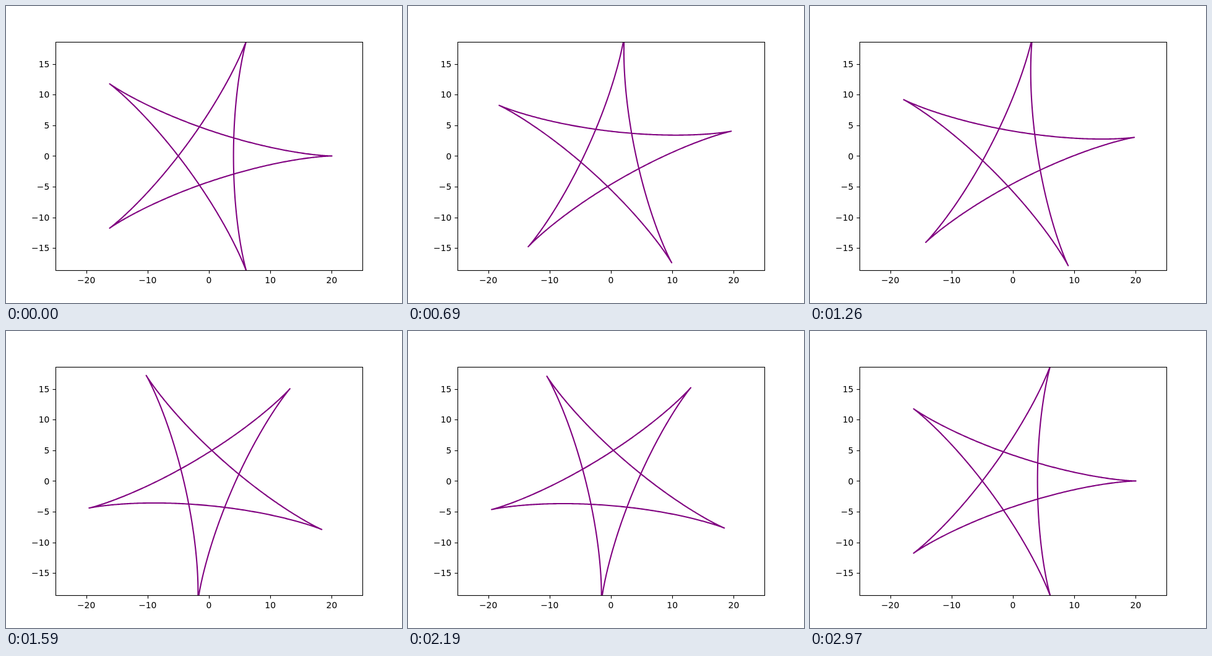
An HTML page with a canvas for the animation above (3 s loop, 640 px wide and 480 px high).

```html
<!DOCTYPE html>
<html lang="en">
<head>
<meta charset="utf-8">
<title>Rotating star hypocycloid</title>
<style>
html, body { margin: 0; width: 100%; height: 100%; overflow: hidden; background: #fff; }
canvas { display: block; }
</style>
</head>
<body>
<canvas id="plot" width="640" height="480"></canvas>
<script>
const ctx = document.getElementById('plot').getContext('2d');

// Plot area and data scale, in pixels
const LEFT = 80, TOP = 57.6, RIGHT = 576, BOTTOM = 427.2;
const CX = 328, CY = 242.4, UNIT = 9.92;
const PT = 100 / 72;

const STEP_MS = 30, STEPS = 100;
const BIG = 20, SMALL = 8, SAMPLES = 1000;

const px = x => CX + x * UNIT;
const py = y => CY - y * UNIT;
const snap = v => Math.floor(v + 0.5) + 0.5;
const label = v => (v < 0 ? '\u2212' : '') + Math.abs(v);

// Five-cusped star: a circle of radius 8 rolling inside one of radius 20
const star = Array.from({ length: SAMPLES + 1 }, (_, i) => {
  const t = 4 * Math.PI * i / SAMPLES;
  const arm = BIG - SMALL, spin = arm / SMALL * t;
  return [
    arm * Math.cos(t) + SMALL * Math.cos(spin),
    arm * Math.sin(t) - SMALL * Math.sin(spin)
  ];
});

function line(x1, y1, x2, y2) {
  ctx.beginPath();
  ctx.moveTo(x1, y1);
  ctx.lineTo(x2, y2);
  ctx.stroke();
}

function drawStar(angle) {
  const c = Math.cos(angle), s = Math.sin(angle);
  ctx.save();
  ctx.beginPath();
  ctx.rect(LEFT, Math.round(TOP), RIGHT - LEFT, Math.round(BOTTOM) - Math.round(TOP));
  ctx.clip();
  ctx.strokeStyle = '#800080';
  ctx.lineWidth = 1.5 * PT;
  ctx.lineJoin = 'round';
  ctx.lineCap = 'square';
  ctx.beginPath();
  for (const [x, y] of star) ctx.lineTo(px(x * c - y * s), py(x * s + y * c));
  ctx.stroke();
  ctx.restore();
}

function drawAxes() {
  const l = snap(LEFT), r = snap(RIGHT), t = snap(TOP), b = snap(BOTTOM);
  ctx.strokeStyle = ctx.fillStyle = '#000';
  ctx.lineWidth = 0.8 * PT;
  ctx.lineCap = 'butt';
  ctx.lineJoin = 'miter';
  ctx.font = `${10 * PT}px "DejaVu Sans", sans-serif`;
  ctx.textBaseline = 'alphabetic';

  ctx.textAlign = 'center';
  for (let v = -20; v <= 20; v += 10) {
    const x = snap(px(v));
    line(x, b, x, b + 5);
    ctx.fillText(label(v), px(v), 448);
  }
  ctx.textAlign = 'right';
  for (let v = -15; v <= 15; v += 5) {
    const y = snap(py(v));
    line(l - 5, y, l, y);
    ctx.fillText(label(v), 70.3, Math.round(py(v) + 5.28));
  }
  ctx.strokeRect(l, t, r - l, b - t);
}

function draw(now) {
  const step = Math.floor(now / STEP_MS) % STEPS;
  ctx.fillStyle = '#fff';
  ctx.fillRect(0, 0, 640, 480);
  drawStar(2 * Math.PI * step / (STEPS - 1));
  drawAxes();
  requestAnimationFrame(draw);
}

draw(0);
</script>
</body>
</html>
```
